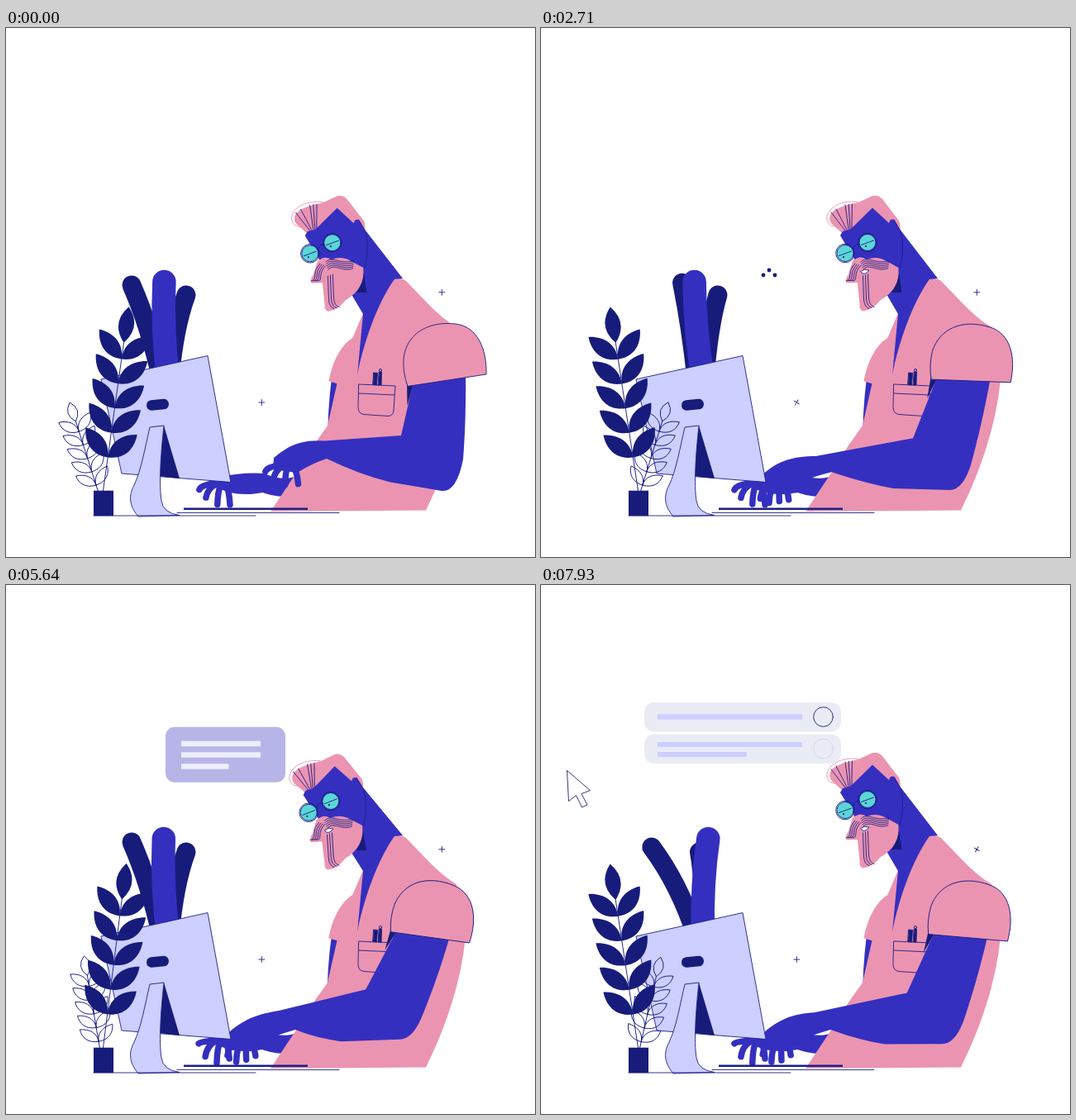
These frames come from a looping animation (640 px wide and 640 px high, 8000 ms). An HTML page:

```html
<!DOCTYPE html>
<html lang="en">
<head>
<meta charset="utf-8">
<title>At the desk</title>
<style>
  html, body { margin: 0; width: 100%; height: 100%; overflow: hidden; background: #fff; }
  svg { display: block; width: 100vw; height: 100vh; }
  .blue { fill: #352fc0; }
  .navy { fill: #171c7b; }
  .pink { fill: #eb94b1; }
  .lav { fill: #cccfff; }
  .grey { fill: #e9ecf4; }
  .teal { fill: #5bd6d6; }
  .ink { stroke: #1b1f86; stroke-width: .9; stroke-linejoin: round; }
  .line { fill: none; stroke: #1b1f86; stroke-width: .9; stroke-linecap: round; }
  .limb { fill: none; stroke: #352fc0; stroke-linecap: round; stroke-linejoin: round; }
  .tube { fill: none; stroke: #171c7b; stroke-width: 23; stroke-linecap: round; }
</style>
</head>
<body>
<svg viewBox="0 0 640 640" xmlns="http://www.w3.org/2000/svg">
  <path id="plus0" class="line" d="M-3.5 0H3.5M0-3.5V3.5"/>
  <path id="plus1" class="line" d="M-3.5 0H3.5M0-3.5V3.5"/>

  <!-- far arm -->
  <path id="farUpper" class="blue"/>
  <path id="farFore" class="limb" stroke-width="22"/>
  <path id="farPalm" class="blue"/>
  <path id="farFingers" class="limb" stroke-width="7.5"/>
  <path id="farSleeve" class="pink" d="M421 374C404 383 394 406 390 427L403 431L428 400Z"/>

  <!-- torso -->
  <path class="pink" d="M470 304Q478 301 484 306L508 331Q528 352 545 362L556 425Q549 500 508 583.500L320 585L352 537L372 505L389 481L401 428L418 378L432 345Z"/>
  <g class="line">
    <path d="M427 431L471 433L469 463Q468 469.500 462 469.500L433 467.500Q426 466.500 426 459ZM427 442L470 444"/>
    <path class="navy" d="M445 417L449.500 417.500L448.500 432L444 431.500ZM451.500 416L454.500 416L454 432L450.500 432Z"/>
    <circle cx="453" cy="414" r="1.600"/>
  </g>

  <!-- neck and head -->
  <path id="neck" class="blue"/>
  <g id="head">
    <path class="line" style="stroke:#eb94b1" d="M384 210.500C361 207 344 220 346 232Q348 241 358 240"/>
    <path class="pink" d="M349.500 228C352 219 365 215 384 211L399 204Q407 200.500 413 207L433 233Q436 238 434 248L380 262L354 239Q348 234 349.500 228Z"/>
    <path class="blue" d="M401 217.500L421 236Q423 229 428 233L434 244C440 260 437 278 434 291L410 296L380 281L362 251L365 246L375 243Z"/>
    <path class="navy" d="M432 289L436.500 320L424 320Q432 308 432 289Z"/>
    <path class="line" d="M427 232L434 244C440 260 437 278 434 291"/>
    <path class="pink" d="M377 282Q386 274 394 280Q406 275 418 282L432.500 290C434 307 427 320 411 329Q401 341 390 342.500Q385 342 385.500 334L383 308L370 308.500Q367 305 372 298Z"/>
    <path id="hairLines" class="line"/>
    <path id="moustache" class="line"/>
    <path id="beardLines" class="line"/>
    <path id="mouth" d="M386.500 294.500Q391 301 397 293Q391 291 386.500 294.500Z" fill="#fff" class="ink"/>
    <path class="line" d="M378 267Q380 260 385 262"/>
    <g id="lenses"></g>
  </g>

  <!-- near arm -->
  <path id="arm" class="blue"/>
  <path id="fingers" class="limb" stroke-width="7.5"/>
  <g id="sleeve">
    <path class="navy" d="M485 425L485.500 457L493 430Z"/>
    <path class="pink ink" d="M486 433.500L581 419C582 388 570 361 544 358C508 354 484 372 481 400Q480 417 486 433.500Z"/>
  </g>

  <!-- floating interface -->
  <g id="dots" class="navy"><circle r="2.400"/><circle r="2.400"/><circle r="2.400"/></g>
  <g id="bubble">
    <rect class="blue" x="-72.500" y="-33.500" width="145" height="67" rx="11"/>
    <path class="lav" d="M-53.500-16.500h96v6.500h-96zM-53.500-3h96v6.500h-96zM-53.500 11h57.500v6.500h-57.500z"/>
  </g>
  <g id="row1">
    <rect class="grey"/><rect class="lav"/>
    <circle class="line" cx="341.500" cy="159.500" r="11.800"/>
  </g>
  <g id="row2">
    <rect class="grey" x="125" y="180.500" width="238" height="35.500" rx="12"/>
    <path class="lav" d="M141 190h175v6h-175zM141 202h108v6h-108z"/>
    <circle class="line" style="stroke:#ccd2fb" cx="341.500" cy="198" r="11.800"/>
  </g>
  <g id="doc">
    <path class="grey ink" d="M-21-29.500H13L25.500-18L27 0Q25 15 27 28Q27 33.500 20 33.500H-20Q-28 33.500-27 27Q-23 15-25 2Q-28-10-27-23Q-27-29.500-21-29.500Z"/>
    <path class="ink" fill="#fff" d="M13-29.500V-18H25.500Z"/>
    <path class="line" d="M-18.500 .7H16M-18.500 7.500H16M-18.500 14.200H16M-20-24Q-20-34-15.500-34T-11.500-29V-20Q-12-16-16-16T-20-20V-25Q-19-29-16-28T-14-23"/>
  </g>

  <!-- tubes behind the screen -->
  <path id="tubeL" class="tube"/>
  <path id="tubeR" class="tube"/>
  <path id="tubeM" class="tube" style="stroke:#352fc0;stroke-width:28.500"/>

  <!-- screen and floor -->
  <path class="lav ink" d="M115 425L244 396.500L272 549.500L140 539Z"/>
  <rect class="navy" x="170" y="449.500" width="27" height="12.500" rx="6" transform="rotate(-5 183.500 456)"/>
  <path class="navy" d="M191 481L210 545L184 542Z"/>
  <path class="lav ink" d="M174 483L191 481C187 518 185 552 188 572Q190 587 210 589.500L160 591C149 578 148 566 155 553C164 534 168 508 174 483Z"/>
  <path class="line" d="M106 590H302M207 586.500H403"/>
  <path class="line" style="stroke-width:2.600;stroke-linecap:butt" d="M215 581.700H365"/>

  <g id="sprig" class="line"></g>
  <g id="plant" class="navy"></g>
  <rect class="navy" x="106" y="559.700" width="24" height="30.500"/>
  <path id="cursor" fill="#fff" class="ink" d="M0 0L2 37L11 30L18 44.500L24.500 41.500L17.500 28L28 24Z"/>
</svg>
<script>
const LOOP = 8000, TAU = Math.PI * 2;
const SHOULDER = [523, 356], NAPE = [464, 337];

const $ = id => document.getElementById(id);
const set = (el, attrs) => { for (const k in attrs) el.setAttribute(k, attrs[k]); };
const shape = (id, d) => $(id).setAttribute('d', d);
const move = (id, tf, opacity = 1) => set($(id), { transform: tf, opacity });
const show = (sel, on) => document.querySelectorAll(sel).forEach(el => el.setAttribute('opacity', on ? 1 : 0));
const repeat = (n, fn) => Array.from({ length: n }, (_, i) => fn(i)).join('');

const mix = (a, b, p) => a + (b - a) * p;
const span = (t, a, b) => {
  const v = Math.max(0, Math.min(1, (t - a) / (b - a)));
  return v * v * (3 - 2 * v);
};
const wave = (t, period, peak = 0) => Math.cos((t - peak) / period * TAU);
// Soft swell from 0 to 1 and back, w ms to each side of its peak
const bump = (t, peak, w) => Math.abs(t - peak) < w ? (1 + wave(t, 2 * w, peak)) / 2 : 0;

function spin(x, y, deg, [cx, cy]) {
  const r = deg / 360 * TAU, c = Math.cos(r), s = Math.sin(r);
  x -= cx; y -= cy;
  return [cx + x * c - y * s, cy + x * s + y * c];
}

// Stem with five leaf pairs and a tip leaf, growing up from its origin
function foliage(first, gap, w, h, base, tip, half) {
  const leaf = (y, s) => `M0 ${y}C${s * w * .65} ${y} ${s * w * .97} ${y - h * .45} ${s * w} ${y - h}` +
    `C${s * w * .42} ${y - h * .94} 0 ${y - h * .6} 0 ${y}Z`;
  const mid = (base + tip) / 2;
  return `<path class="line" d="M0 0V${base}"/><path d="` +
    repeat(5, i => leaf(first - gap * i, 1) + leaf(first - gap * i, -1)) +
    `M0 ${base}Q${-half * 2} ${mid} 0 ${tip}Q${half * 2} ${mid} 0 ${base}Z"/>`;
}

const lens = (x, y) => `<g transform="translate(${x} ${y})">
  <circle class="line" r="11.3"/><circle class="teal ink" r="10"/>
  <path class="line" d="M-7.5 3L7.5-2.5"/><circle class="navy pupil" cx="-2" cy="4.5" r="1.1"/>
  <path class="line squint" d="M-2 4.5L6-2.5"/></g>`;

function build() {
  $('plant').innerHTML = foliage(-41, 30, 31.5, 32, -181, -225, 9.5);
  $('sprig').innerHTML = foliage(-23, 17, 20, 18, -104, -128, 6);
  $('lenses').innerHTML = lens(368, 272.5) + lens(395, 259.5);
  shape('moustache',
    repeat(4, i => `M${380 + i * 2.3} ${285 + i * .8}q-6 6-6 13t-5 ${8 - i}`) +
    repeat(5, i => `M${387 + i * .7} ${283 + i * 2.3}c8-9 17 4 ${34 - i} -1.5`));
  shape('hairLines',
    repeat(2, i => `M${351 + i * 6} ${223 - i * 4}L${368 + i * 2} ${245 - i}`) +
    repeat(3, i => `M${368 + i * 4.2} ${214 - i * .5}L${372 + i * 2} 243`));
  shape('beardLines', repeat(3, i => `M${389.5 + i * 3} ${300 - i}l1 28q.5 10 6.500 11.500`));
}

const tube = (id, base, bend, x, y) => shape(id, `M${base} 425Q${bend} 362 ${x} ${y}`);

// Four fingers fanned around the knuckles, each tapping in its own beat
function drawFingers(id, x, y, from, step, t) {
  shape(id, repeat(4, i => {
    const a = (from - step * i) / 360 * TAU;
    const dx = 27 * Math.cos(a), dy = 27 * Math.sin(a);
    const tap = 2.2 * Math.sin(t / 62 + i * 1.9 + x);
    return `M${x + dx * .35 + 2} ${y + 1}Q${x + dx * .9} ${y + dy * .35} ${x + dx} ${y + dy + tap}`;
  }));
}

function drawHead(t) {
  const nod = -10 * bump(t, 1100, 1200) - 4 * bump(t, 3500, 750) - 4 * bump(t, 6200, 1000);
  const at = (x, y) => spin(x, y, nod, NAPE);
  move('head', `rotate(${nod} ${NAPE})`);
  shape('neck', `M${at(433, 242)}L480 303L470 304C450 331 432 382 425 420L432 346L${at(418, 322)}L${at(415, 280)}Z`);
  show('#mouth', t > 1800);
  show('.pupil', nod > -7);
  show('.squint', nod < -7);
}

function drawNearArm(t) {
  // e lowers the shoulder, w brings the hand to the keys
  const e = span(t, 0, 950) - .35 * bump(t, 2710, 750) - .18 * span(t, 5500, 6700);
  const w = 1 - (1 - e) ** 3, sag = 26 * e * (1 - e);
  const top = (x, y) => spin(x, y, 16.7 * e, SHOULDER);
  const pose = (x0, y0, x1, y1, p = e, drop = sag) => [mix(x0, x1, p), mix(y0, y1, p) + drop];
  const [x, y] = pose(340, 528, 286 - 9 * bump(t, 3500, 1600), 549, w, 0);
  move('sleeve', `rotate(${16.7 * e} ${SHOULDER})`);
  shape('arm', `M${top(495, 415)}L${top(492, 432)}L${pose(478, 493, 435, 489)}` +
    `L${pose(385, 499.5, 330, 515, w, sag * .6)}` +
    `C${x + 20} ${y - 30} ${x + 4} ${y - 25} ${x - 16} ${y - 8}` +
    `L${x - 17} ${y + 6}L${x + 12} ${y + 10}Q${x + 32} ${y - 2} ${pose(388, 521, 350, 538, w, 0)}` +
    `Q${pose(427, 540, 375, 548)} ${pose(465, 549.5, 405, 552)}` +
    `L${pose(527, 560, 476, 549.5)}Q${pose(545, 562, 491, 549)} ${pose(553, 522, 502, 524)}` +
    `Q${top(557, 470)} ${top(556, 412)}Z`);
  drawFingers('fingers', x, y, mix(165, 132, w), mix(35, 26, w), t);
}

function drawFarArm(t) {
  const x = 260 - 29 * bump(t, 1070, 1000) + 26 * bump(t, 3500, 800) - 27 * bump(t, 6710, 1200);
  const elbow = 388 - (258 - x) * .7;
  move('farSleeve', `rotate(${(258 - x) * .28} 418 378)`);
  shape('farUpper', `M402 418L394 423Q${elbow - 1} 468 ${elbow} 508L410 500L412 420Z`);
  shape('farFore', `M${elbow + 13} 500Q368 574 ${x + 50} 550`);
  shape('farPalm', `M${x + 56} 539Q${x + 25} 537 ${x} 543L${x - 8} 553Q${x + 15} 570 ${x + 56} 561Z`);
  drawFingers('farFingers', x, 550, 165, 33, t);
}

function drawTubes(t) {
  const s = t % 7000;
  const l = 152 - 19 * bump(s, 1070, 1000) + 40 * bump(s, 3600, 1700);
  const m = 194 + 8.5 * wave(t, 3500, 1050);
  const r = 218 - 27 * bump(s, 1000, 800) - 8 * bump(s, 3300, 1200);
  tube('tubeL', 188, mix(188, l, .38), l, 420 - Math.sqrt(112 ** 2 - (l - 178) ** 2));
  tube('tubeM', 196, m / 2 + 93, m, 307);
  tube('tubeR', 198, mix(200, r, .2), r, 323 - 15 * bump(s, 3500, 700));
}

function drawInterface(t) {
  show('#dots', t > 850 && t < 3250);
  [...$('dots').children].forEach((dot, i) => {
    const hop = Math.max(0, wave(t, 901, 2710 + (i - 1) * 325));
    set(dot, { cx: 269 + i * 7, cy: 299 - 6 * hop });
  });

  const rise = span(t, 3250, 4010), out = span(t, 5250, 5900);
  move('bubble', `translate(${mix(260, 265.5, rise)} ${mix(402, 258.5, rise) - 82 * out})
    rotate(${8 * (1 - rise)}) scale(${rise})`, 1 - out);

  const grow = span(t, 6100, 6500), wide = span(t, 6760, 7350);
  const [pill, bar, ring] = $('row1').children;
  set(pill, { x: mix(206, 125, wide), y: mix(206, 142, wide), width: mix(136.5, 238, wide),
    height: mix(27.5, 35.5, wide), rx: mix(13.5, 12, wide) });
  set(bar, { x: mix(230, 141, wide), y: mix(216.3, 156.3, wide), width: mix(96.5, 175, wide), height: 6.4 });
  set(ring, { opacity: span(t, 7200, 7400) });
  move('row1', `translate(${274 * (1 - grow)} ${219.5 * (1 - grow)}) scale(${grow})`);

  const second = span(t, 7250, 7600);
  move('row2', `translate(0 ${14 * (1 - second)})`, second);

  const pop = span(t, 6200, 6620), fly = span(t, 6850, 7400);
  move('doc', `translate(${mix(262, 302, pop)} ${mix(390, 274.3, pop) - 195 * fly})
    scale(${pop * (1 - .5 * fly)})`, 1 - fly);

  const slide = span(t, 7480, 7930);
  move('cursor', `translate(${mix(-45, 31.5, slide)} ${mix(205, 224.5, slide)})`);
}

function draw(t) {
  move('plant', `translate(117.5 560) rotate(${8.3 * wave(t, 5260, 20) - .35})`);
  move('sprig', `translate(116 575) rotate(${.3 - 18 * wave(t, 4880)})`);
  move('plus0', `translate(527.3 319.8) rotate(${90 * span(t, 7700, 8300)})`);
  move('plus1', `translate(309.3 453) rotate(${90 * span(t, 2450, 3120)})`);
  drawTubes(t);
  drawFarArm(t);
  drawHead(t);
  drawNearArm(t);
  drawInterface(t);
}

build();
const start = performance.now();
(function tick() {
  draw((performance.now() - start) % LOOP);
  requestAnimationFrame(tick);
})();
</script>
</body>
</html>
```
